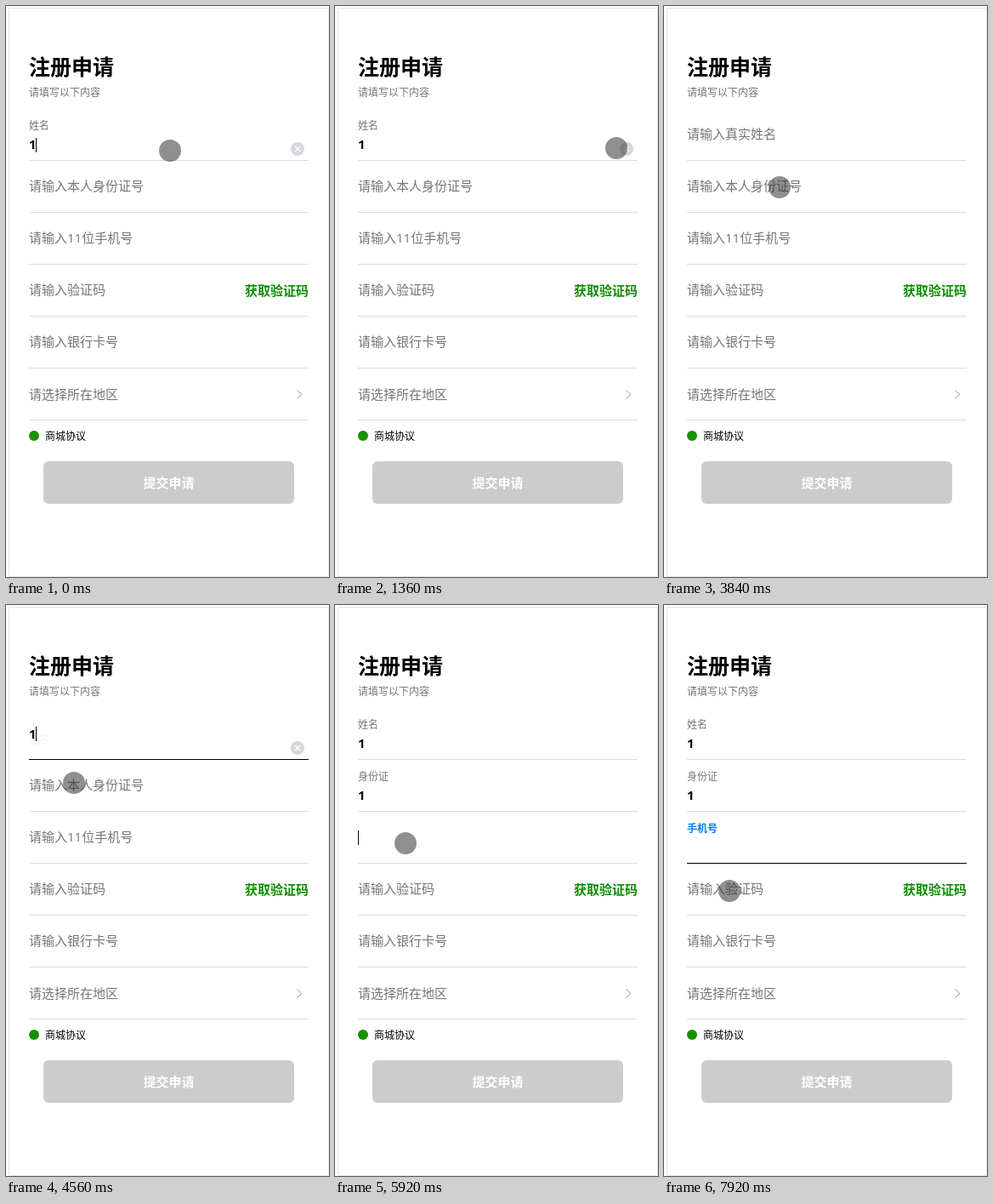
Write an HTML page that moves like this. It is 380 px wide and 671 px high and loops after 8 s.

```html
<!DOCTYPE html>
<html lang="zh-CN">
<head>
<meta charset="utf-8">
<title>注册申请</title>
<style>
html, body { margin: 0; width: 100%; height: 100%; overflow: hidden; background: #fff; }
svg { display: block; width: 380px; height: 671px; }
text { font-family: "Open Sans", "Noto Sans CJK SC", "Noto Sans CJK", sans-serif; font-size: 15px; fill: #757575; }
.small { font-size: 12px; }
.bold { font-weight: 700; }
</style>
</head>
<body>
<svg id="stage" viewBox="0 0 380 671">
  <path d="M3.5 2.5H379.5V670.5H3.5Z" fill="none" stroke="#e1e5e9"/>
  <text class="bold" x="27" y="81" style="font-size:25px;fill:#000">注册申请</text>
  <text class="small" x="27" y="106">请填写以下内容</text>
  <g id="rows"></g>
  <text class="bold" x="356" y="340" text-anchor="end" style="fill:#0b8c00">获取验证码</text>
  <path d="M342.5 451.5L348 456.5L342.5 461.5" fill="none" stroke="#999"/>
  <circle cx="33" cy="505" r="6" fill="#1a9000"/>
  <text class="small" x="46" y="510" style="fill:#000">商城协议</text>
  <rect x="44" y="535" width="295" height="50" rx="6" fill="#cccccc"/>
  <text class="bold" x="191.5" y="566" text-anchor="middle" style="fill:#fff">提交申请</text>
  <circle id="touch" r="13" fill="#333" fill-opacity=".55"/>
</svg>
<script>
const LOOP = 8000, STEP = 80, PITCH = 61, MOVE = 400;
const smooth = p => { p = Math.min(1, Math.max(0, p)); return p * p * (3 - 2 * p); };
const rise = (t, start) => smooth((t - start) / MOVE);
const within = (t, spans) => (spans || []).find(s => t >= s[0] && t < s[1]);

// focus spans: [start, end, blink reference]
const fields = [
  { label: '姓名', hint: '请输入真实姓名',
    text: [[0, 2560], [4480, LOOP]],
    focus: [[0, 2080, -140], [4240, 4880, 4480]],
    active: [[4480, 4880]],
    clear: [[0, 2560], [4480, 4880]],
    lift: t => 1 - rise(t, 2650) + rise(t, 4500) },
  { label: '身份证', hint: '请输入本人身份证号',
    text: [[5120, LOOP]],
    focus: [[4880, 5920, 5120]],
    active: [[5120, 5920]],
    clear: [[5120, 5920]],
    lift: t => rise(t, 5140) },
  { label: '手机号', hint: '请输入11位手机号',
    focus: [[5920, LOOP, 6420]],
    active: [[6160, LOOP]],
    lift: t => rise(t, 6140) },
  { hint: '请输入验证码' },
  { hint: '请输入银行卡号' },
  { hint: '请选择所在地区', base: 157 }
];

const path = [
  [0, 193, 170], [400, 318, 168], [640, 318, 168], [1120, 331, 167],
  [1440, 331, 167], [1920, 342, 171], [2720, 342, 171], [3840, 136, 213],
  [4240, 86, 168], [4560, 80, 209], [5040, 80, 209], [5680, 83, 280],
  [6960, 83, 280], [7600, 54, 336], [7680, 54, 336], [7760, 77, 336]
];

function add(parent, tag, attrs, content) {
  const el = document.createElementNS('http://www.w3.org/2000/svg', tag);
  set(el, attrs);
  if (content) el.textContent = content;
  return parent.appendChild(el);
}
function set(el, attrs) {
  for (const k in attrs) el.setAttribute(k, attrs[k]);
}
const show = (el, on) => set(el, { visibility: on ? 'visible' : 'hidden' });

const rows = document.getElementById('rows');
const touch = document.getElementById('touch');

fields.forEach((f, i) => {
  const g = add(rows, 'g', { transform: `translate(0 ${i * PITCH})` });
  f.line = add(g, 'path', { d: 'M27 181.5H356', stroke: '#dcdcdc' });
  f.hintEl = add(g, 'text', { x: 27, y: f.base || 156 }, f.hint);
  if (!f.label) return;
  f.labelEl = add(g, 'text', { x: 27, class: 'small' }, f.label);
  f.value = add(g, 'text', { x: 27, class: 'bold', style: 'fill:#000' }, '1');
  f.caret = add(g, 'rect', { width: 1, height: 17, fill: '#000' });
  f.clearEl = add(g, 'g', {});
  add(f.clearEl, 'circle', { cx: 343, cy: 168, r: 8, fill: '#d6d7dc' });
  add(f.clearEl, 'path', { d: 'M340 165l6 6m0-6l-6 6', stroke: '#fff', 'stroke-width': 1.3 });
});

function drawField(f, t) {
  const p = f.lift(t), drop = 12 * p;
  const focus = within(t, f.focus), filled = within(t, f.text), active = within(t, f.active);
  const blink = focus && (t < focus[2] || Math.floor((t - focus[2]) / 500) % 2 === 0);
  set(f.line, { stroke: active ? '#000' : '#dcdcdc' });
  set(f.labelEl, {
    y: 164 - 19 * p, opacity: p,
    style: active ? 'fill:#0a7cf5;font-weight:700' : ''
  });
  set(f.hintEl, { y: 156 + drop });
  set(f.value, { y: 156 + drop });
  set(f.caret, { x: filled ? 35 : 27, y: Math.round(142.5 + drop) });
  show(f.hintEl, !focus && !filled);
  show(f.value, filled);
  show(f.caret, blink);
  show(f.clearEl, within(t, f.clear));
}

function drawTouch(t) {
  let i = path.findIndex(k => k[0] > t);
  if (i < 0) i = path.length;
  const a = path[i - 1], b = path[i] || a;
  const p = smooth((t - a[0]) / (b[0] - a[0] || 1));
  set(touch, { cx: a[1] + (b[1] - a[1]) * p, cy: a[2] + (b[2] - a[2]) * p });
}

function draw(now) {
  const t = Math.floor((now % LOOP) / STEP) * STEP;
  fields.forEach(f => f.label && drawField(f, t));
  drawTouch(t);
}

const began = performance.now();
function tick() {
  draw(performance.now() - began);
  requestAnimationFrame(tick);
}
tick();
</script>
</body>
</html>
```
